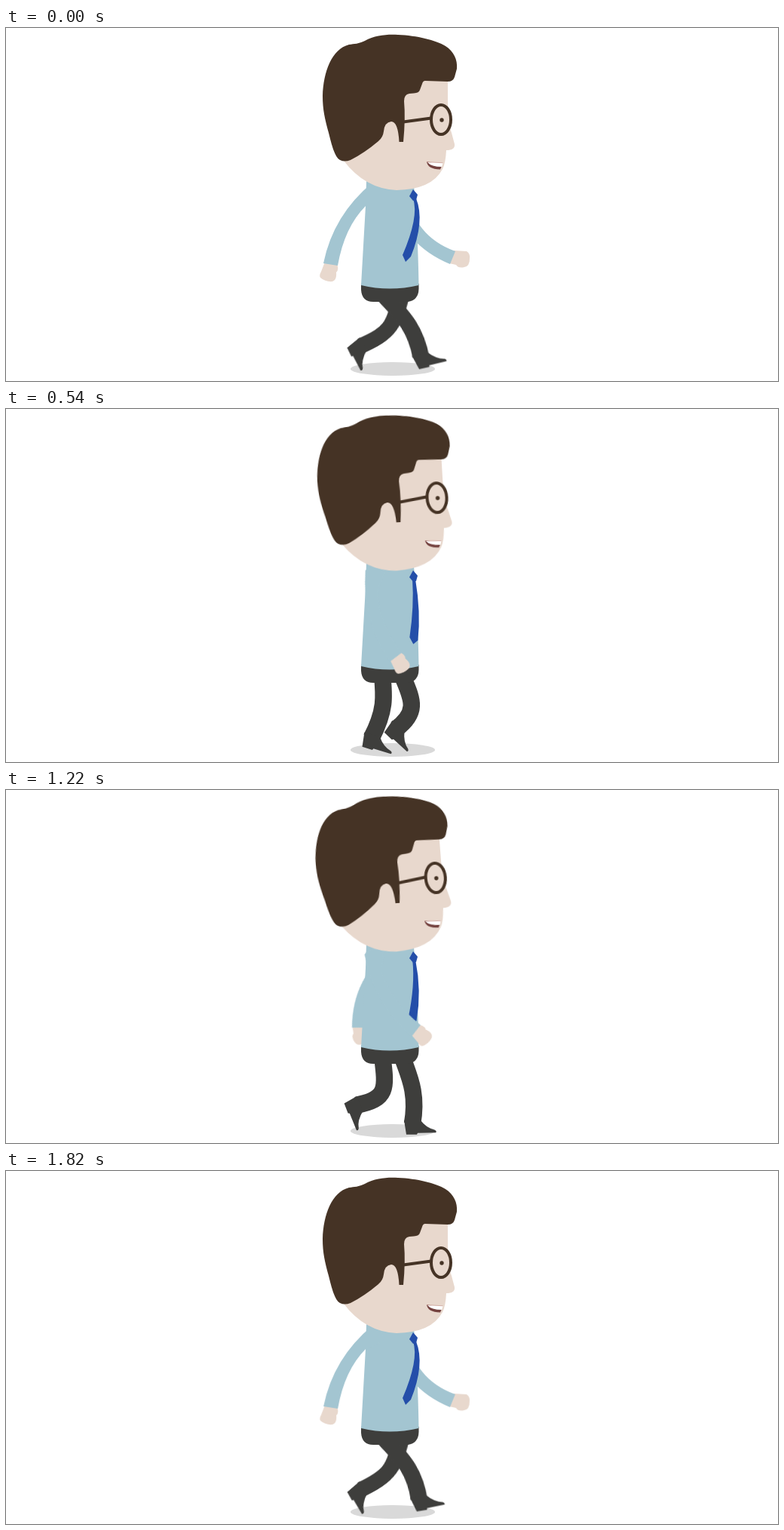
An HTML page without scripts that plays this animation: 1024x468 px, repeating every 1.84 s.

```html
<!DOCTYPE html>
<html lang="en">
<head>
<meta charset="utf-8">
<title>Walking man</title>
<style>
  html, body { margin: 0; width: 100%; height: 100%; overflow: hidden; background: #fff; }
  svg { display: block; width: 100%; height: 100%; --cycle: 1.84s; }

  .hair { fill: #453325; }
  .skin { fill: #e8d8cd; }
  .shirt { fill: #a3c5d1; }
  .tie { fill: #244ea9; }
  .dark { fill: #3e3e3c; }
  .frame { stroke: #453325; stroke-width: 4; }

  /* head and arms swing from the opening pose and back */
  .swing { animation: swing var(--cycle) cubic-bezier(.364, 0, .636, 1) infinite; }
  @keyframes swing { 52% { transform: rotate(var(--turn)); } }
  .head { --turn: -5.5deg; transform-origin: 508px 214px; }
  .near { --turn: -77deg; transform-origin: 492px 220.4px; }
  .far { --turn: 85.5deg; transform-origin: 522.5px 217.5px; }

  /* the tie bends at every step and hangs straight in between */
  .blade { animation: hang calc(var(--cycle) / 2) ease-in-out infinite; }
  @keyframes hang {
    50% { d: path("M539 226L543 226Q550 270 547 307L541 312L536 303Q541 262 539 226Z"); }
  }

  /* both legs share one stride, half a cycle apart; the shoe follows the shin */
  .leg {
    fill: none; stroke: #3e3e3c; stroke-width: 22.5; marker-end: url(#shoe);
    animation: stride var(--cycle) linear var(--shift, 0s) infinite,
               cross var(--cycle) ease-in-out infinite;
  }
  .lead { --lean: 8.5deg; }
  .trail { --lean: -13deg; --shift: calc(var(--cycle) / -2); }
  @keyframes stride {
    0%, 100% { d: path("M0 0C13 20 37 36 39 85"); }   /* heel down */
    17% { d: path("M0 0C8 25 21 48 13 91"); }         /* standing */
    39% { d: path("M0 0C-1 33 -8 48 -36 80"); }       /* push off */
    56% { d: path("M0 0C-1 48 1 54 -42 65"); }        /* heel up */
    67% { d: path("M0 0C6 44 8 58 -34 66"); }         /* lift */
    85% { d: path("M0 0C15 24 32 44 4 75"); }         /* pass */
  }
  @keyframes cross {
    0%, 100% { transform: skewX(var(--lean)); }
    18%, 82% { transform: skewX(0deg); }
  }
</style>
</head>
<body>
<svg viewBox="0 0 1024 468">
  <defs>
    <marker id="shoe" markerUnits="userSpaceOnUse" markerWidth="80" markerHeight="80" orient="auto" overflow="visible">
      <path class="dark" transform="rotate(-100)" d="M-11-5L10-6Q19 6 30 8Q33 10 31 11.5L7 12L6 14H-8Z"/>
    </marker>
  </defs>

  <ellipse cx="513" cy="452" rx="56" ry="9" fill="#d9d9d9"/>

  <g class="swing far">
    <path class="skin" d="M594 295L611 296Q616 299 615 306Q615 316 608 317Q600 319 597 314L588 312Z"/>
    <path class="shirt" d="M511 222Q526 287 589 313L596 296Q540 276 532 215Z"/>
  </g>

  <g transform="translate(525 352)"><path class="leg trail" d="M0 0C-1 40 0 52 -40 70"/></g>
  <g transform="translate(499 352)"><path class="leg lead" d="M0 0C13 20 37 36 39 85"/></g>

  <path class="dark" d="M471 339V347Q472 363 487 363H533Q547 361 547.5 346V339Z"/>
  <path class="shirt" d="M478 203L477 236L471 341Q509 350 547.5 341Q546 260 541 209Z"/>

  <path class="blade tie" d="M540 226L544 226Q556 256 537 303L530 310L526 301Q548 250 540 226Z"/>
  <path class="tie" d="M540 214L546 221L544 228L540 229L535 223Z"/>

  <g class="swing near">
    <path class="skin" d="M423 310L439 313Q442 320 438 324Q439 334 433 336Q424 337 417 331Q415 328 418 323Z"/>
    <path class="shirt" d="M486 205Q434 248 421 312L440 315Q449 264 477 236L500 226Q503 206 486 205Z"/>
  </g>

  <g class="swing head">
    <path class="skin" d="M586 66V100Q587 128 591 139L595 154Q596 162 584 162Q583 180 579 187Q565 214 518 215Q476 213 448 176L495 130L525 80L555 60Z"/>
    <path class="hair" d="M443 175C436 171 432 155 428 139C423 121 420 108 420 90C421 58 432 28 455 22C462 21 468 21 476 17C490 9 508 8 520 9C545 10 570 16 583 24C594 31 599 42 598 54L595 65Q593 71 586 71L556 70Q553 70 552 74L549 82Q548 86 541 86.5L535 87Q528 88 528 97Q530 120 527 151H521.5Q520 124 511 124Q502 125 501 137Q500 145 494 150Q475 166 457 175Q449 178 443 175Z"/>
    <path class="frame" d="M527 124.5L564 119.5"/>
    <ellipse class="skin frame" cx="577" cy="121.500" rx="13" ry="19.500"/>
    <circle class="hair" cx="578" cy="122" r="2.700"/>
    <path fill="#74423f" d="M558 177Q559 187 576 187.5L578 183L562 178Z"/>
    <path fill="#fff" d="M559 178L579.5 179L578 184Q564 184 559 178Z"/>
    <path fill="none" stroke="#c99a92" stroke-width=".7" d="M558 177.5L579.5 178.800"/>
  </g>
</svg>
</body>
</html>
```
